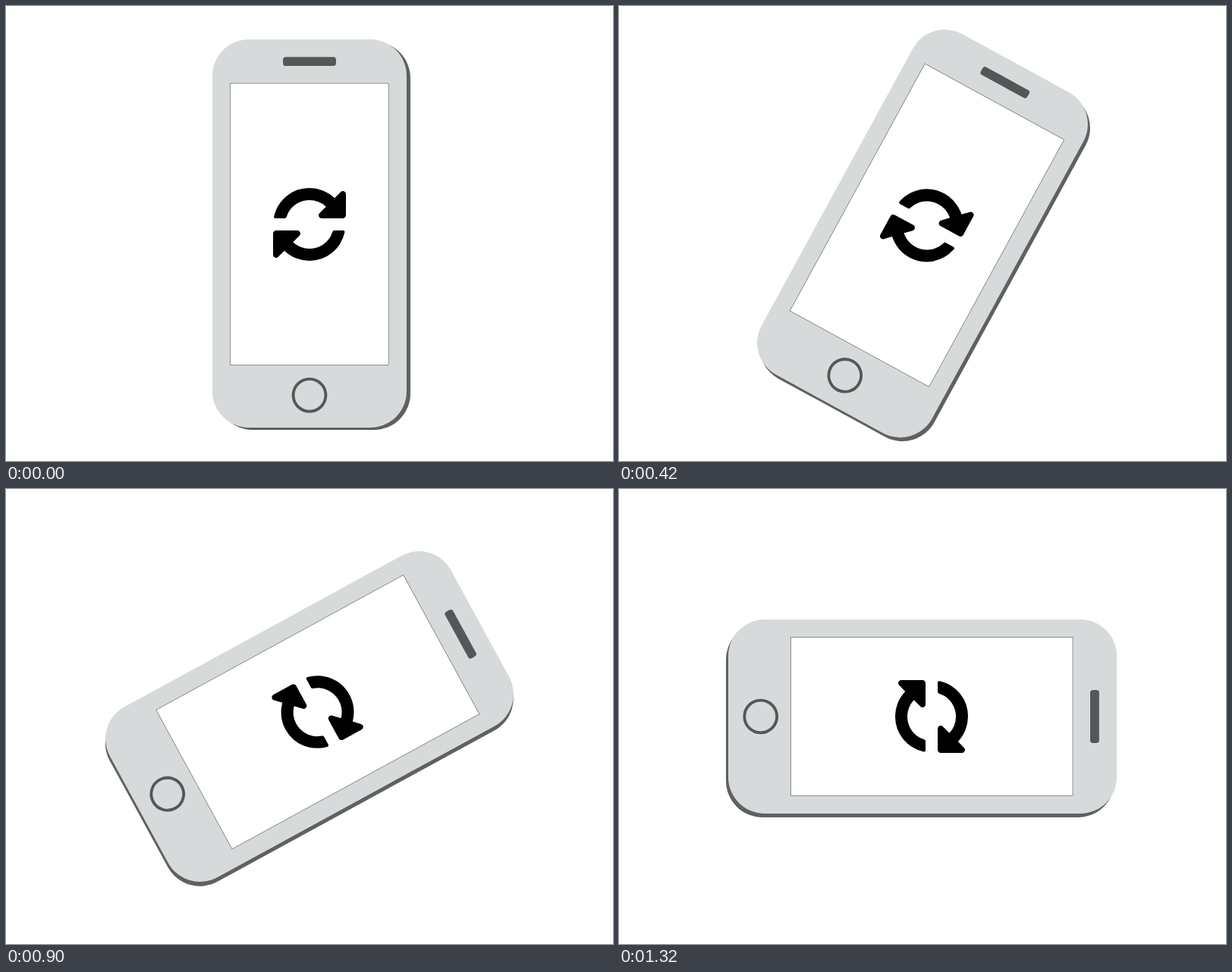
Write an HTML page that moves like this. It is 800 px wide and 600 px high and loops after 1.8 s.

```html
<!DOCTYPE html>
<html lang="en">
<head>
<meta charset="utf-8">
<title>Rotating phone</title>
<style>
  html, body { margin: 0; width: 100%; height: 100%; overflow: hidden; background: #fff; }
  svg { display: block; width: 100%; height: 100%; }
</style>
</head>
<body>
<svg viewBox="0 0 800 600">
  <g id="phone">
    <rect x="277" y="47" width="256" height="512" rx="48" fill="#5f6061"/>
    <rect x="272" y="44" width="256" height="512" rx="48" fill="#d6dadb"/>
    <rect x="365" y="67.2" width="70" height="11.8" rx="3.2" ry="4.5" fill="#555657"/>
    <rect x="295.5" y="102" width="209" height="371.3" fill="#fff" stroke="#555657" stroke-width=".6"/>
    <circle cx="400" cy="513.3" r="21.4" fill="none" stroke="#555657" stroke-width="3.8"/>
    <g transform="translate(352 240) scale(.0625)">
      <path d="M1511 928q0 5-1 7-64 268-268 434.5t-478 166.5q-146 0-282.5-55t-243.5-157l-129 129q-19 19-45 19t-45-19-19-45v-448q0-26 19-45t45-19h448q26 0 45 19t19 45-19 45l-137 137q71 66 161 102t187 36q134 0 250-65t186-179q11-17 53-117 8-23 30-23h192q13 0 22.5 9.5t9.5 22.5z"/>
      <path d="M1536 128v448q0 26-19 45t-45 19h-448q-26 0-45-19t-19-45 19-45l138-138q-148-137-349-137-134 0-250 65t-186 179q-11 17-53 117-8 23-30 23h-199q-13 0-22.5-9.5t-9.5-22.5v-7q65-268 270-434.5t480-166.5q146 0 284 55.5t245 156.5l130-129q19-19 45-19t45 19 19 45z"/>
    </g>
  </g>
</svg>
<script>
  const LOOP = 1800, TURN = 1320, STEP = 30;
  const phone = document.getElementById("phone");
  const start = performance.now();

  // Steady quarter turn in 30 ms steps, then a rest until the loop ends.
  function draw(ms) {
    const t = Math.floor((ms % LOOP) / STEP) * STEP;
    const angle = 90 * Math.min(t / TURN, 1);
    phone.setAttribute("transform", `rotate(${angle} 400 300)`);
  }

  function tick() {
    draw(performance.now() - start);
    requestAnimationFrame(tick);
  }

  draw(0);
  requestAnimationFrame(tick);
</script>
</body>
</html>
```
